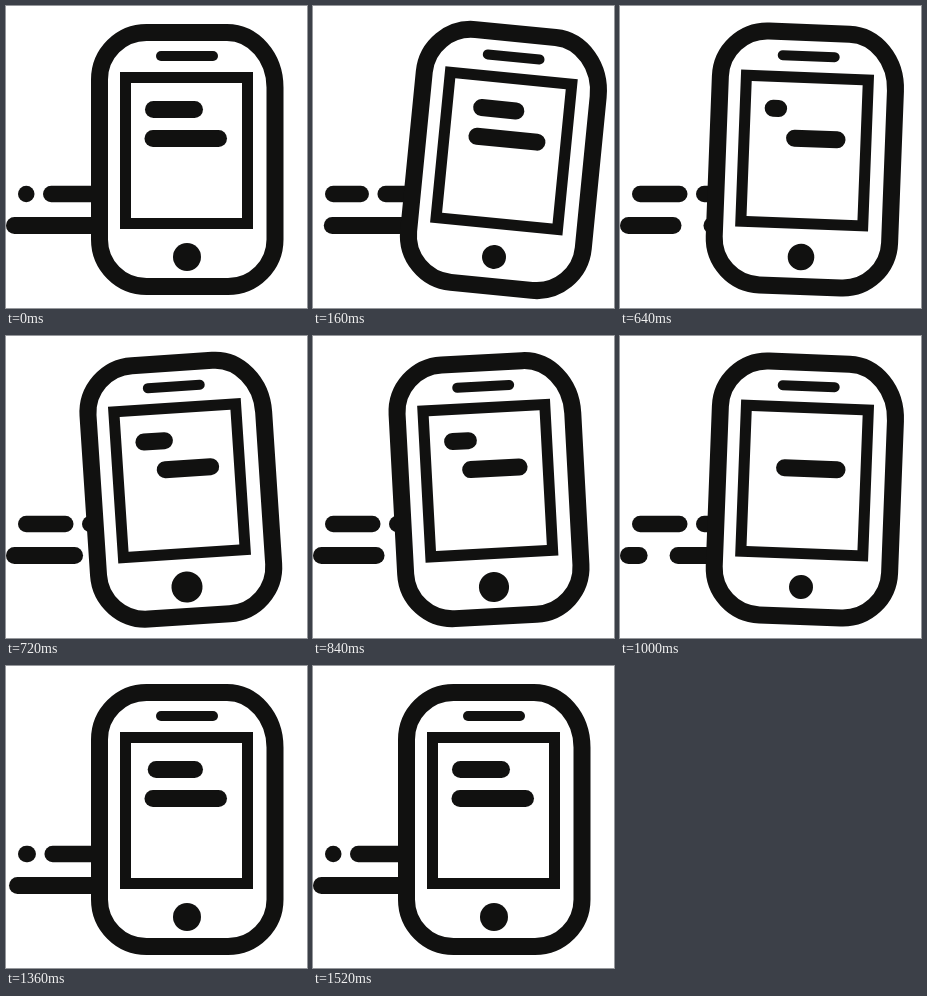
An HTML page with a canvas that plays this animation: 301x302 px, repeating every 1960 ms.

```html
<!DOCTYPE html>
<html lang="en">
<head>
<meta charset="utf-8">
<title>Phone in motion</title>
<style>
  html, body { margin: 0; width: 100%; height: 100%; overflow: hidden; background: #fff; }
  canvas { display: block; }
</style>
</head>
<body>
<canvas id="stage" width="301" height="302"></canvas>
<script>
const ctx = document.getElementById('stage').getContext('2d');
const INK = '#111110';
const LOOP = 1960, STEP = 40, LAST_STEP = 38;
const PIVOT = { x: 181, y: 251 };

const linear = p => p;
const cubicOut = p => 1 - (1 - p) ** 3;
const quadInOut = p => p < 0.5 ? 2 * p * p : 1 - 2 * (1 - p) ** 2;
const cubicInOut = p => p < 0.5 ? 4 * p ** 3 : 1 - 4 * (1 - p) ** 3;

// Equivalent to cubic-bezier(0.25, 0, 0.25, 1).
const bezier = (a, b, u) => 3 * a * u * (1 - u) ** 2 + 3 * b * u * u * (1 - u) + u ** 3;
function smooth(p) {
  let low = 0, high = 1;
  for (let i = 0; i < 24; i++) {
    const mid = (low + high) / 2;
    if (bezier(0.25, 0.25, mid) < p) low = mid; else high = mid;
  }
  return bezier(0, 1, low);
}

// Each key is [step, value, easing used to arrive there].
function track(keys) {
  return n => {
    const i = keys.findIndex(key => key[0] >= n);
    if (i < 0) return keys[keys.length - 1][1];
    if (i === 0) return keys[0][1];
    const [start, from] = keys[i - 1], [end, to, ease] = keys[i];
    return from + (to - from) * ease((n - start) / (end - start));
  };
}

const tilt = track([[0, 0], [13, 8.4, cubicOut], [19, -4, cubicInOut], [25, 2.2, cubicInOut], [31, 0, cubicInOut]]);
const buttonRadius = track([[0, 14], [13, 11, cubicOut], [19, 15.6, cubicInOut], [25, 12, cubicInOut], [31, 14, cubicInOut]]);
const upperTrail = track([[0, 37], [12, 76, cubicOut], [26, 76, linear], [38, 37, cubicOut]]);
const lowerTrail = track([[0, 0], [13, 22, smooth], [19, 100.5, smooth], [38, 0, smooth]]);
const firstText = track([[0, 0], [13, 13.5, smooth], [19, 90, smooth], [38, 0, smooth]]);
const secondText = track([[0, 0], [13, 27.5, quadInOut], [18, 20, linear], [25, 13, linear], [30, 0, linear]]);

// Round-capped bar given by its outer ends; bars shorter than a dot vanish.
function bar(left, right, y, thickness) {
  const r = thickness / 2;
  if (right - left < thickness - 0.5) return;
  ctx.lineWidth = thickness;
  ctx.lineCap = 'round';
  ctx.beginPath();
  ctx.moveTo(left + r, y);
  ctx.lineTo(Math.max(right - r, left + r + 0.01), y);
  ctx.stroke();
}

// A bar with a gap of the given width that ends at resume.
function splitBar(left, right, y, thickness, resume, gap) {
  bar(left, Math.min(resume - gap, right), y, thickness);
  bar(Math.max(resume, left), right, y, thickness);
}

function drawPhone(n) {
  ctx.save();
  ctx.translate(PIVOT.x, PIVOT.y);
  ctx.rotate(tilt(n) * Math.PI / 180);
  ctx.translate(-PIVOT.x, -PIVOT.y);

  ctx.lineWidth = 17;
  ctx.fillStyle = '#fff';
  ctx.beginPath();
  ctx.roundRect(93.5, 26.5, 175.5, 254, [47, { x: 48, y: 55 }, 47, 47]);
  ctx.fill();
  ctx.stroke();

  ctx.lineWidth = 11;
  ctx.strokeRect(119.5, 71.5, 122, 146);
  bar(150, 212, 50, 10);

  splitBar(139, 197, 103.5, 17, 139 + firstText(n), 51);
  bar(138.5 + secondText(n), 221, 132.5, 17);

  ctx.fillStyle = INK;
  ctx.beginPath();
  ctx.arc(PIVOT.x, PIVOT.y, buttonRadius(n), 0, 2 * Math.PI);
  ctx.fill();
  ctx.restore();
}

function draw() {
  const time = performance.now() % LOOP;
  const n = Math.min(LAST_STEP, Math.floor(time / STEP));
  ctx.fillStyle = '#fff';
  ctx.fillRect(0, 0, 301, 302);
  ctx.strokeStyle = INK;
  splitBar(12, 110, 188, 16.5, upperTrail(n), 8.5);
  splitBar(0, 110, 219.5, 17, lowerTrail(n), 22);
  drawPhone(n);
  requestAnimationFrame(draw);
}
draw();
</script>
</body>
</html>
```
